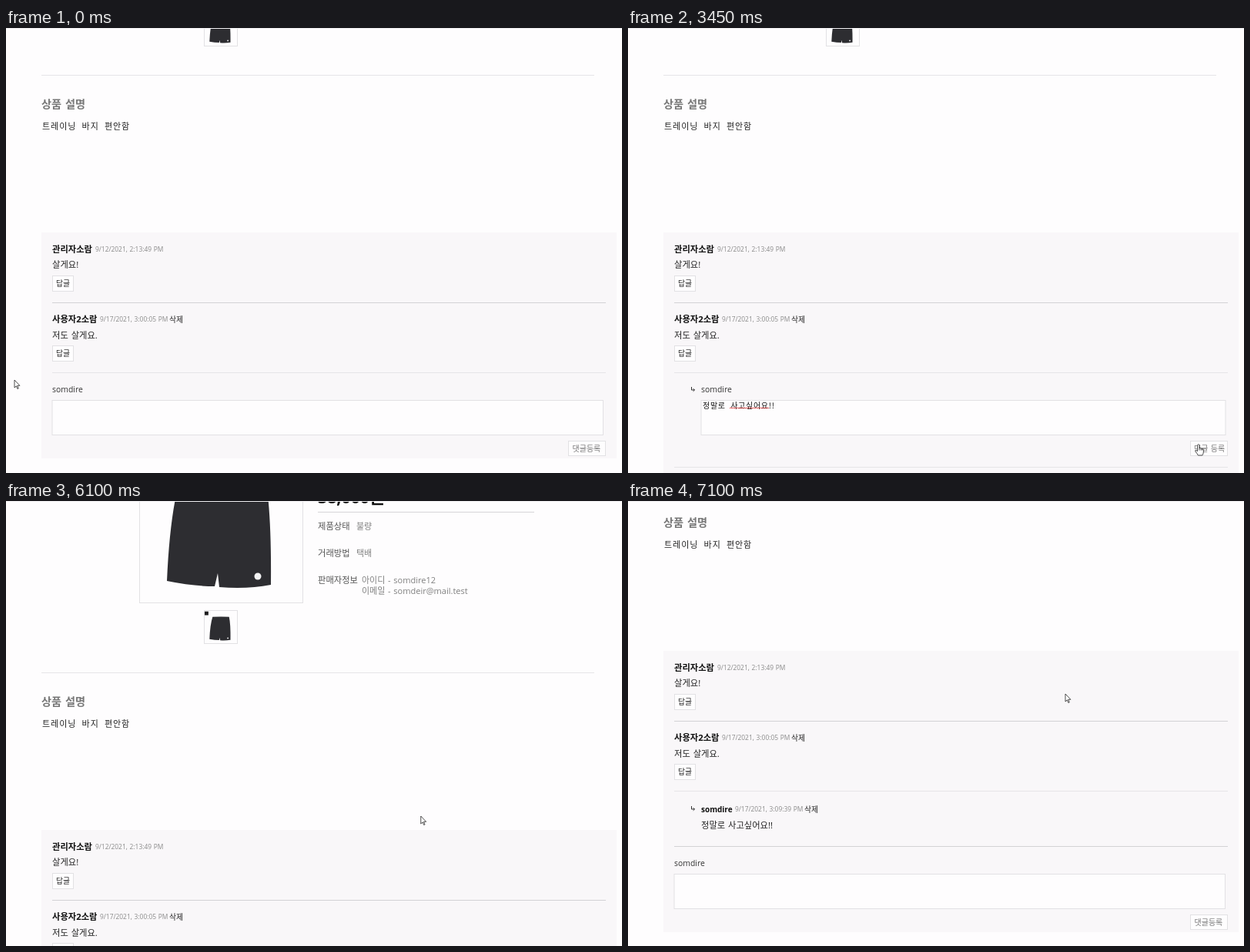
Recreate the animation shown at these times as an HTML page. Size 800 by 579 pixels, loop 7.15 s.

```html
<!DOCTYPE html>
<html lang="ko">
<head>
<meta charset="utf-8">
<title>상품 댓글</title>
<style>
html, body { margin: 0; width: 100%; height: 100%; overflow: hidden; background: #fefdfe; }
svg { display: block; width: 800px; height: 579px; }
text { font-family: "Open Sans", "Noto Sans CJK KR", "Noto Sans CJK JP", sans-serif; word-spacing: .08em; white-space: pre; }
.gulim { font-family: "Noto Sans CJK KR", "Noto Sans CJK JP", sans-serif; letter-spacing: .7px; word-spacing: 3px; }
.wide { letter-spacing: 1px; }
</style>
</head>
<body>
<svg id="stage" viewBox="0 0 800 579"></svg>
<script>
const LOOP = 7150, STEP = 50, SUBMIT = 5800, BLUE = '#5bc3d7';

// Drawing helpers; text is placed by its left edge and vertical centre.
const text = (x, cy, size, str, fill = '#222', attrs = '') =>
  `<text x="${x}" y="${cy + size * .37}" font-size="${size}" fill="${fill}" ${attrs}>${str}</text>`;
const box = (x, y, w, h, stroke = '#e2e1e4', fill = '#fefdfe', sw = 1) =>
  `<rect x="${x + sw / 2}" y="${y + sw / 2}" width="${w - sw}" height="${h - sw}" fill="${fill}" stroke="${stroke}" stroke-width="${sw}"/>`;
const rule = (x1, x2, y, fill = '#e6e5e8', h = 1, attrs = '') =>
  `<rect x="${x1}" y="${y}" width="${x2 - x1}" height="${h}" fill="${fill}" ${attrs}/>`;
const bold = 'font-weight="700"';

const comment = (x, y, name, dateX, date, delX, size = 11.3) =>
  text(x, y, size, name, '#111', bold) + text(dateX, y, 8.4, date, '#8a8a8a') +
  (delX ? text(delX, y, 9.8, '삭제') : '');
const replyButton = y => box(60, y, 28, 21) + text(65, y + 10.5, 9.8, '답글');
const submitButton = (x, label) => box(730, 537, 49, 20) + text(x, 547, 10, label, '#777');
const hook = y => `<path d="M82.5 ${y - 3}v4h4m-1.8-1.8 1.8 1.8-1.8 1.8" fill="none" stroke="#333"/>`;

const product = `
  <g id="goods">
    <rect x="5" y="6" width="24" height="24" fill="#1c1c1e"/>
    <path d="M56 41Q109 38 162 41Q172 85 171 189 140 195 104 192L102 174 98 191Q70 191 36 184 40 90 56 41Z" fill="#2d2d31"/>
    <path d="M56 48Q109 45 163 48" fill="none" stroke="#39393d" stroke-width="1.5"/>
    <circle cx="154" cy="178" r="4.5" fill="#f4f4f4"/>
  </g>`;

const shop =
  [47, 54, 61].map(y => rule(46, 67, y, '#c4c4c6', 1.5)).join('') +
  text(360, 46, 18.5, '루미봄 장터', BLUE, `font-weight="900" stroke="${BLUE}" stroke-width=".6"`) +
  text(675, 49, 9.4, '마이페이지 | 로그아웃', '#444') +
  box(46, 78, 724, 29, BLUE, '#fefdfe', 2) +
  text(410, 92, 9.7, '원하는 물품을 검색해보세요.', '#757575', 'text-anchor="middle"') +
  text(46, 138, 9.7, `전체상품 - 남성의류 - <tspan fill="${BLUE}">반바지</tspan>`, '#707070') +
  rule(46, 764, 165, '#e8e7ea') +
  box(173, 193, 213, 213) + `<g transform="translate(173 193)">${product}</g>` +
  box(257, 415, 44, 44) + '<use href="#goods" transform="translate(257 415.5) scale(.202)"/>' +
  text(405, 224, 13.5, '판매중 다루솔(daru) - 남성용 가람솔핏 한달음 5') +
  text(405, 241, 13.5, '인치 숏팬츠 QT3815_024') +
  text(405, 268, 21.3, '38,000원', '#0c0c0c', bold) +
  rule(405, 686, 287, '#d6d5d8') +
  [['제품상태', 306, 455, '불량'], ['거래방법', 341, 455, '택배'], ['판매자정보', 376, 462, '아이디 - somdire12']]
    .map(([k, y, x, v]) => text(405, y, 11.3, k, '#555', 'font-weight="500"') + text(x, y, 11, v, '#808080')).join('') +
  text(462, 390, 11, '이메일 - somdeir@mail.test', '#808080') +
  rule(46, 764, 496) +
  text(46, 533.5, 14.2, '상품 설명', '#777', bold + ' word-spacing="1"') +
  text(47, 562.5, 11, '트레이닝 바지 편안함', '#222', 'class="gulim wide"');

const replyForm =
  hook(470) + text(95, 470, 10.4, 'somdire', '#333') + box(94.5, 484, 682, 46) +
  '<text id="typed" class="gulim" x="97" y="495" font-size="10" fill="#111"></text>' +
  '<path id="compose" stroke="#111" fill="none"/>' +
  `<path id="squiggle" d="M132 495${'l1.5-1 1.5 1'.repeat(17)}" stroke="#d33" stroke-width=".9" fill="none"/>` +
  submitButton(735, '댓글 등록');

const comments =
  '<rect id="panel" x="46" y="266" width="747" fill="#f9f7f9"/>' +
  comment(60, 288, '관리자소람', 116, '9/12/2021, 2:13:49 PM') +
  text(60, 308, 11.3, '살게요!') + replyButton(322) + rule(60, 779, 357, '#d3d2d5') +
  comment(60, 379, '사용자2소람', 122, '9/17/2021, 3:00:05 PM', 212) +
  text(60, 399.5, 11.3, '저도 살게요.') + replyButton(413) + rule(60, 779, 448) +
  '<clipPath id="fold"><rect id="foldBox" x="46" y="449" width="747"/></clipPath>' +
  `<g id="replyForm" clip-path="url(#fold)">${replyForm}</g>` +
  `<g id="reply">${hook(471)}${comment(95, 472, 'somdire', 139, '9/17/2021, 3:09:39 PM', 229, 10)}` +
  text(95, 492.5, 11.3, '정말로 사고싶어요!!') + '</g>' +
  '<g id="form">' + rule(60, 779, 448, '#e6e5e8', 1, 'id="formRule"') +
  text(60, 470, 10.4, 'somdire', '#333') + box(59.5, 484, 716.5, 46) + submitButton(735.5, '댓글등록') + '</g>';

const $ = id => document.getElementById(id);
$('stage').innerHTML =
  `<rect width="800" height="579" fill="#fefdfe"/>
  <g id="page">${shop}<g transform="translate(0 435)">${comments}</g></g>
  ${rule(0, 800, 0, '#eeedf0')}
  <path id="cursor" stroke="#222" stroke-width=".8" stroke-linejoin="round"/>`;

const shapes = {
  arrow: 'M0 0V10L2.3 7.9 3.9 11.5 5.3 10.9 3.7 7.3H6.9Z',
  hand: 'M-1.2 1Q0-.6 1.2 1V5Q3.1 4.3 3.3 5.6 4.7 4.9 5 6.2 6.6 6 6.6 7.5V10.5Q6.2 13 5.2 14.5H-.4Q-1.8 12-4 9-4.4 7.2-2.6 8L-1.2 9.2ZM1.2 5V8M3.3 5.6V8M5 6.2V8',
  beam: 'M-2-5Q0-5 0-4 0-5 2-5M0-4V4M-2 5Q0 5 0 4 0 5 2 5'
};

// time, x, y, shape held until the next key
const path = [
  [0, 11, 458, 'arrow'], [25, 11, 458, 'arrow'], [250, 76, 424, 'hand'], [525, 76, 424, 'hand'],
  [650, 95, 437, 'hand'], [760, 108, 458, 'arrow'], [850, 120, 478, 'arrow'], [975, 120, 478, 'arrow'],
  [1100, 128, 486, 'beam'], [1550, 171, 507, 'beam'], [2775, 171, 507, 'beam'], [3150, 560, 534, 'arrow'],
  [3350, 738, 543, 'hand'], [3550, 743.5, 540, 'hand'], [5275, 743.5, 540, 'hand'], [5300, 700, 520, 'arrow'],
  [5400, 470, 421, 'arrow'], [5525, 470, 421, 'arrow'], [5600, 530, 425, 'arrow'], [5775, 530, 425, 'arrow'],
  [5800, 538, 413, 'arrow'], [6200, 539, 409, 'arrow'], [6500, 540, 400, 'arrow'],
  [7100, 568, 251, 'arrow'], [LOOP, 568, 251, 'arrow']
];

// Every state of the text while its syllables are composed.
const states = [''];
let done = '';
for (const keys of ['ㅈ저정', 'ㅁ마말', 'ㄹ로', ' ', 'ㅅ사', 'ㄱ고', 'ㅅ시싶', 'ㅇ어', 'ㅇ요', '!', '!']) {
  for (const k of keys) states.push(done + k);
  done += keys.at(-1);
}
const lateKeys = [2450, 2650, 2700, 2750];

const clamp = v => Math.min(1, Math.max(0, v));
const show = (id, on) => $(id).setAttribute('visibility', on ? 'visible' : 'hidden');

function drawTyping(t) {
  const early = t < 1700 ? 0 : Math.min(18, 1 + Math.floor((t - 1700) / 37));
  const str = states[early + lateKeys.filter(k => t >= k).length];
  const el = $('typed');
  if (el.textContent !== str) el.textContent = str;
  const endOf = n => n ? 97 + el.getSubStringLength(0, n) : 97;
  const end = endOf(str.length);
  let d = '';
  if (t >= 1550 && t < 2800) d += `M${end + .5} 487V496`;
  if (str && !/[ !]$/.test(str)) d += `M${endOf(str.indexOf(' ') + 1)} 495.5H${end}`;
  $('compose').setAttribute('d', d);
  show('squiggle', t >= 3000 && t < SUBMIT);
}

function drawCursor(t) {
  const i = path.findIndex(k => k[0] > t);
  const [t0, x0, y0, shape] = path[i - 1], [t1, x1, y1] = path[i];
  const p = (t - t0) / (t1 - t0);
  const c = $('cursor');
  c.setAttribute('d', shapes[shape]);
  c.setAttribute('fill', shape === 'beam' ? 'none' : '#fff');
  c.setAttribute('transform', `translate(${x0 + (x1 - x0) * p} ${y0 + (y1 - y0) * p})`);
}

function draw(now) {
  const t = Math.floor(now / STEP + .02) * STEP % LOOP, posted = t >= SUBMIT;
  const unfold = .5 - Math.cos(Math.PI * clamp((t - 517) / 200)) / 2;
  const extra = posted ? 72 : 123 * unfold;
  const scroll = posted ? 506 * (1 - (1 - clamp((t - 5950) / 550)) ** 2.43) : 435;

  $('page').setAttribute('transform', `translate(0 ${-Math.round(scroll)})`);
  $('page').setAttribute('opacity', posted ? clamp(.53 + (t - SUBMIT) / 200) : 1);
  $('panel').setAttribute('height', 294 + extra);
  $('form').setAttribute('transform', `translate(0 ${Math.round(extra)})`);
  $('formRule').setAttribute('fill', posted ? '#d3d2d5' : '#e6e5e8');
  $('foldBox').setAttribute('height', Math.max(0, extra - 14));
  $('replyForm').style.display = posted ? 'none' : '';
  show('reply', posted);
  if (posted) show('squiggle', false);
  else drawTyping(t);
  drawCursor(t);
  requestAnimationFrame(draw);
}
requestAnimationFrame(draw);
</script>
</body>
</html>
```
